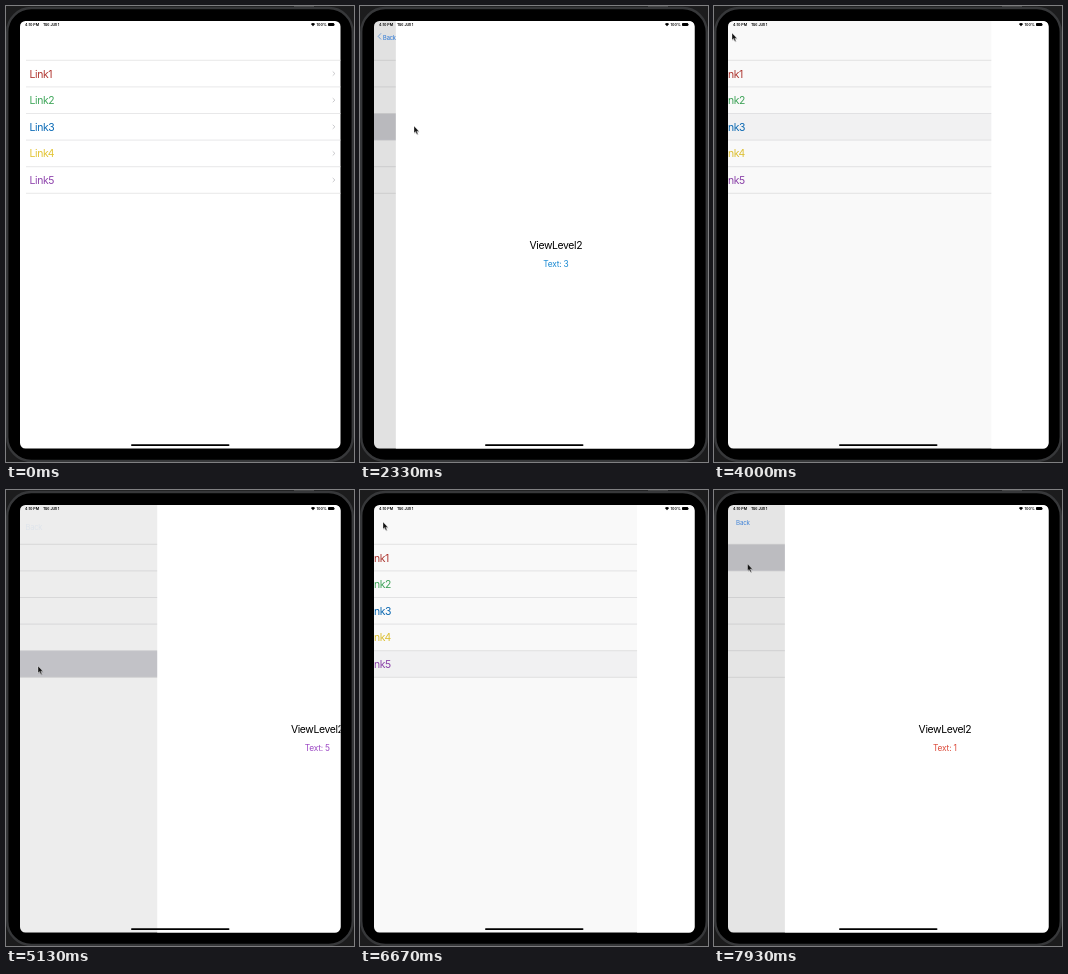
An HTML page that plays this animation: 348 px wide and 456 px high, repeating every 8000 ms.

```html
<!DOCTYPE html>
<html lang="en">
<head>
<meta charset="utf-8">
<title>Link list navigation</title>
<style>
  html, body { margin: 0; width: 100%; height: 100%; overflow: hidden; background: #1c1c1d; }
  svg { display: block; width: 348px; height: 456px; }
  text { font-family: Inter, "Liberation Sans", sans-serif; }
  .link, .title { font-size: 10.4px; letter-spacing: -.036em; }
  .sub { font-size: 8.4px; letter-spacing: -.025em; }
  .title, .sub { text-anchor: middle; }
  .back { font-size: 5.3px; letter-spacing: -.03em; fill: #1f70d4; }
  .status { font-size: 3.7px; font-weight: 600; letter-spacing: -.01em; }
  .line { fill: none; stroke-linecap: round; stroke-linejoin: round; }
</style>
</head>
<body>
<svg viewBox="0 0 348 456">
  <defs>
    <clipPath id="screen"><rect x="14" y="15" width="320.5" height="427.5" rx="5.5"/></clipPath>
  </defs>

  <rect x="288" width="20" height="1.2" fill="#4a4a4c"/>
  <rect x="1.2" y="2" width="345.6" height="453" rx="24" fill="#000" stroke="#37383a" stroke-width="2.4"/>

  <g clip-path="url(#screen)">
    <rect x="14" y="15" width="321" height="428" fill="#fff"/>
    <g id="list">
      <rect id="highlight" x="14" width="321" height="26.6" fill="#d1d1d6"/>
      <g id="rows"></g>
    </g>
    <rect id="dim" x="14" y="15" width="321" height="428"/>
    <g id="detail">
      <rect x="14" y="15" width="321" height="428" fill="#fff"/>
      <text class="title" x="174" y="242.8">ViewLevel2</text>
      <text class="sub" id="sub" x="174" y="261.2"></text>
    </g>
    <path id="chevron" class="line" d="M20.8 27.6 18.2 30.4 20.8 33.2" stroke="#1f70d4" stroke-width=".95"/>
    <text class="back" id="back">Back</text>

    <text class="status" x="19" y="20">4:10 PM</text>
    <text class="status" x="37" y="20">Tue Jun 1</text>
    <path d="M307 20.3 304.9 17.9Q307 16.2 309.1 17.9Z"/>
    <text class="status" x="310.6" y="20">100%</text>
    <rect x="322" y="17.1" width="6.2" height="3" rx=".8"/>
    <rect x="328.5" y="18" width=".5" height="1.2" rx=".2"/>
    <rect x="125" y="438.2" width="98.5" height="1.8" rx=".9"/>
  </g>

  <g id="cursor">
    <path d="M.6 1V8L2.2 6.6 3.3 9.2 4.5 8.7 3.4 6.2H5.6Z" opacity=".25"/>
    <path d="M0 0V7L1.6 5.6 2.7 8.2 3.8 7.7 2.8 5.2H4.9Z" fill="#111" stroke="#fff" stroke-width=".35"/>
  </g>
</svg>

<script>
const $ = id => document.getElementById(id);
const set = (id, attrs) => { for (const k in attrs) $(id).setAttribute(k, attrs[k]); };
const clamp = v => Math.max(0, Math.min(1, v));

const LOOP = 8000, STEP = 1000 / 15;
const WIDTH = 320.5, TOP = 54.3, ROW = 26.6;
const linkColors = ['#b0352f', '#3fa65a', '#0a6ab6', '#e2c433', '#8f45ad'];
const textColors = { 1: '#dc4a3a', 3: '#1788d2', 5: '#9c47c4' };

// Navigation: start time, row, and whether the detail is pushed or popped
const moves = [
  { at: 2067, row: 3, push: true },
  { at: 3800, row: 3, push: false },
  { at: 5000, row: 5, push: true },
  { at: 6467, row: 5, push: false },
  { at: 7733, row: 1, push: true }
];

// Pointer path: time, x, y
const path = [
  [1066, 4, 319], [1267, 38, 250], [1467, 72, 180], [1667, 66, 132],
  [1867, 54, 121], [1933, 54, 120], [2867, 54, 120], [3133, 39, 74],
  [3667, 18, 27], [4200, 18, 27], [4467, 28, 156], [4600, 30, 170],
  [4733, 32, 176], [5600, 32, 176], [5800, 28, 126], [5867, 27, 101],
  [6067, 24, 55], [6333, 23, 32], [6933, 23, 32], [7267, 30, 53],
  [7533, 33.5, 73], [8000, 33.5, 74]
];

const line = y => `<path d="M20 ${y}H335" stroke="#dedee0" stroke-width=".7"/>`;
$('rows').innerHTML = line(TOP) + linkColors.map((color, i) => {
  const y = TOP + ROW * i, mid = y + ROW / 2;
  return `<text class="link" x="23.5" y="${mid + 4}" fill="${color}">Link${i + 1}</text>
    <path class="line" d="M327 ${mid - 1.8} 328.9 ${mid} 327 ${mid + 1.8}" stroke="#b4b4b8" stroke-width=".7"/>
    ${line(y + ROW)}`;
}).join('');

// Remaining share of a critically damped spring
function spring(ms) {
  const x = 0.0184 * Math.max(0, ms - 29);
  return (1 + x) * Math.exp(-x);
}

function pointer(t) {
  const i = path.findIndex(p => p[0] > t);
  if (i < 1) return null;
  const [t0, x0, y0] = path[i - 1], [t1, x1, y1] = path[i];
  const k = (t - t0) / (t1 - t0);
  return [x0 + (x1 - x0) * k, y0 + (y1 - y0) * k];
}

function draw(t) {
  const move = moves.filter(m => m.at <= t + 1).pop();
  let pushed = 0;
  if (move) {
    const rest = spring(t - move.at);
    pushed = move.push ? 1 - rest : rest;
    if (rest < 0.001) pushed = move.push ? 1 : 0;
    set('highlight', { y: TOP + ROW * (move.row - 1) });
    set('sub', { fill: textColors[move.row] });
    $('sub').textContent = 'Text: ' + move.row;
  }
  const away = 1 - pushed;
  set('highlight', { opacity: !move ? 0 : move.push ? 1 : pushed });
  set('list', { transform: `translate(${-0.3 * WIDTH * pushed} 0)` });
  set('dim', { opacity: 0.125 * pushed });
  set('detail', { transform: `translate(${WIDTH * away} 0)` });
  set('back', {
    transform: `translate(${23.8 - 10 * away} ${32.3 + 18 * away}) scale(${1 + away})`,
    opacity: clamp((0.45 - away) / 0.33)
  });
  set('chevron', { opacity: clamp(1 - away / 0.16) });

  const pos = pointer(t);
  set('cursor', pos
    ? { visibility: 'visible', transform: `translate(${pos[0]} ${pos[1]})` }
    : { visibility: 'hidden' });
}

function tick() {
  const t = performance.now() % LOOP;
  draw(Math.floor((t + 5) / STEP) % 120 * STEP);
  requestAnimationFrame(tick);
}
tick();
</script>
</body>
</html>
```
